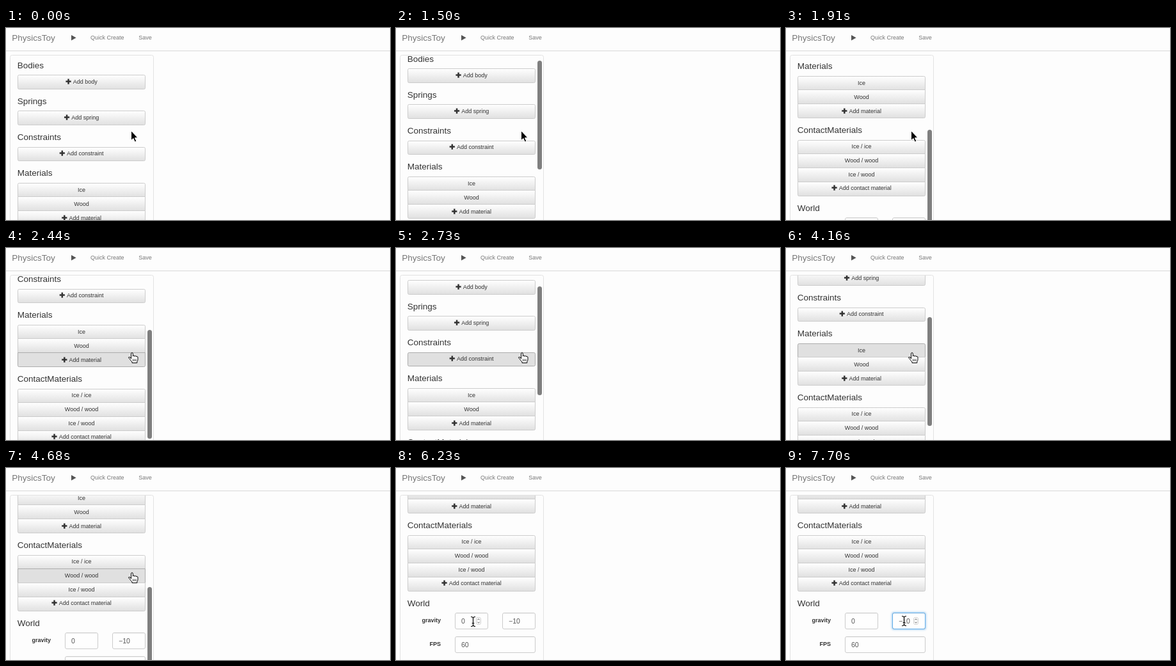
An HTML page for the animation above (8000 ms loop, 600 by 300 pixels).

```html
<!DOCTYPE html>
<html lang="en">
<head>
<meta charset="utf-8">
<title>Physics editor panel</title>
<style>
html, body { margin: 0; width: 100%; height: 100%; overflow: hidden; background: #fdfdfd; }
svg { display: block; width: 600px; height: 300px; font: 9px "Liberation Sans", Arial, sans-serif; fill: #333; }
.nav { fill: #777; }
.head { font-size: 13.5px; }
.label { font-weight: bold; text-anchor: end; }
.value { font-size: 10.5px; fill: #555; }
.btn path.face { fill: url(#face); stroke: #ccc; }
.btn.over path.face { fill: #e0e0e0; stroke: #adadad; }
.field { fill: #fefefe; stroke: #ccc; }
</style>
</head>
<body>
<svg id="stage" viewBox="0 0 600 300">
  <defs>
    <linearGradient id="face" x2="0" y2="1">
      <stop stop-color="#fff"/><stop offset="1" stop-color="#e0e0e0"/>
    </linearGradient>
    <clipPath id="view"><rect x="7" y="43" width="223" height="257"/></clipPath>
    <filter id="blur" x="-20%" y="-40%" width="140%" height="180%"><feGaussianBlur stdDeviation="1.4"/></filter>
  </defs>
  <rect width="600" height="300" fill="#fdfdfd"/>
  <path d="M0 36.5H600" stroke="#f4f4f4"/>
  <path d="M0 35.5H600" stroke="#e0e0e0"/>
  <g class="nav">
    <text x="9.3" y="20" class="head">PhysicsToy</text>
    <path d="M102 11V19.4L109.6 15.2Z" fill="#555"/>
    <text x="132" y="18">Quick Create</text>
    <text x="207.3" y="18">Save</text>
  </g>
  <rect x="6.5" y="42.5" width="224" height="270" rx="3" fill="none" stroke="#e2e2e2"/>
  <g clip-path="url(#view)">
    <g id="content"></g>
    <rect id="bar" x="221" width="7" height="170" rx="3.5" fill="#7f7f7f"/>
  </g>
  <g id="cursor"></g>
</svg>
<script>
const LOOP = 8000, MAX_SCROLL = 237;
const $ = id => document.getElementById(id);
const content = $('content'), bar = $('bar'), cursor = $('cursor');

function add(parent, tag, attrs, text) {
  const el = document.createElementNS('http://www.w3.org/2000/svg', tag);
  for (const key in attrs) el.setAttribute(key, attrs[key]);
  if (text) el.textContent = text;
  parent.append(el);
  return el;
}

// Panel content, in unscrolled coordinates
const buttons = [];

function boxPath(x, y, w, h, top, bottom) {
  const a = top, b = bottom;
  return `M${x} ${y + a}q0 ${-a} ${a} ${-a}h${w - 2 * a}q${a} 0 ${a} ${a}v${h - a - b}` +
    `q0 ${b} ${-b} ${b}h${2 * b - w}q${-b} 0 ${-b} ${-b}z`;
}

function addButton(label, y, base, h = 23, top = 2, bottom = 2) {
  const g = add(content, 'g', { class: 'btn' });
  add(g, 'path', { class: 'face', d: boxPath(18.5, y + .5, 199, h - 1, top, bottom) });
  const text = add(g, 'text', { y: base }, label);
  const icon = label.startsWith('Add') ? 11.5 : 0;
  const x = 118 - (text.getComputedTextLength() + icon) / 2;
  text.setAttribute('x', x + icon);
  if (icon) add(g, 'path', {
    d: `M${x + .2} ${base - 3.4}h8.2m-4.1 -4.1v8.2`, stroke: '#333', 'stroke-width': 2.5
  });
  buttons.push({ g, y, h });
}

function addGroup(labels, y, base) {
  const last = labels.length - 1;
  labels.forEach((label, i) => addButton(label, Math.floor(y + i * 21.7), Math.round(base + i * 21.8),
    23, i ? 0 : 2, i < last ? 0 : 2));
}

function addHead(label, y) {
  add(content, 'text', { class: 'head', x: 17.8, y }, label);
}

function addField(x, y, w, value) {
  const box = { x: x + .5, y: y + .5, width: w - 1, height: 25, rx: 2.5 };
  const glow = add(content, 'rect', {
    ...box, fill: 'none', stroke: '#66afe9', 'stroke-width': 3, filter: 'url(#blur)', opacity: 0
  });
  add(content, 'rect', { ...box, class: 'field' });
  add(content, 'path', { d: `M${x + 2} ${y + 1.5}h${w - 4}`, stroke: '#f3f3f3' });
  const ring = add(content, 'rect', { ...box, fill: 'none', stroke: '#66afe9', opacity: 0 });
  add(content, 'text', { class: 'value', x: x + 10, y: y + 17 }, value);
  const spin = add(content, 'g', { transform: `translate(${x + w - 19} ${y + 7})` });
  add(spin, 'rect', { x: .5, y: .5, width: 7, height: 11, rx: 2.5, fill: '#fcfcfc', stroke: '#d4d4d4' });
  add(spin, 'path', { d: 'M2.2 4.6L4 2.7L5.8 4.6M2.2 7.4L4 9.3L5.8 7.4', fill: 'none', stroke: '#555', 'stroke-width': .9 });
  return { x, y, w, h: 26, glow, ring, spin };
}

addHead('Bodies', 63);
addButton('Add body', 73, 87);
addHead('Springs', 119);
addButton('Add spring', 129, 143);
addHead('Constraints', 175);
addButton('Add constraint', 186, 199, 22);
addHead('Materials', 231);
addGroup(['Ice', 'Wood', 'Add material'], 242, 256);
addHead('ContactMaterials', 331);
addGroup(['Ice / ice', 'Wood / wood', 'Ice / wood', 'Add contact material'], 342, 355);
addHead('World', 453);
add(content, 'text', { class: 'label', x: 70, y: 478 }, 'gravity');
add(content, 'text', { class: 'label', x: 70, y: 515 }, 'FPS');
const fields = [addField(92, 463, 52, '0'), addField(166, 463, 52, '−10')];
const focused = fields[1];
const fps = addField(92, 500, 126, '60');
fps.spin.setAttribute('visibility', 'hidden');
const caret = add(content, 'path', { d: 'M182.5 470v12', stroke: '#333' });

// Pointers, drawn around their hot spot
const pointers = { arrow: add(cursor, 'g', {}), hand: add(cursor, 'g', {}), beam: add(cursor, 'g', {}) };
add(pointers.arrow, 'path', {
  d: 'M.5 -.5V14.7L3.9 11.5L6.3 17L8.8 15.9L6.4 10.7H11Z', fill: '#000', stroke: '#fff'
});
add(pointers.hand, 'path', {
  d: 'M.5 12V4.2Q.5 2.6 1.9 2.6T3.3 4.2V8.2Q3.5 7 4.8 7T6.1 8.5Q6.4 7.4 7.6 7.6T8.7 9Q9 8.2 9.9 8.4T11 10V13' +
    'Q11 15 9.8 16.5V18.5H2V17Q-.5 14.5 -1.5 12.6Q-3.6 11 -3.4 9.8Q-2.5 8.8 -1 10Z',
  fill: '#fff', stroke: '#000', 'stroke-linejoin': 'round'
});
add(pointers.hand, 'path', { d: 'M3.6 12.5v3.5M5.8 12.5v3.5M8 12.5v3.5', stroke: '#000', 'stroke-width': .8 });
for (const [stroke, width] of [['#fff', 2.6], ['#000', 1.2]]) add(pointers.beam, 'path', {
  d: 'M-3 -7.5Q.5 -7.5 .5 -5Q.5 -7.5 4 -7.5M.5 -5.5V5.5M-3 7.5Q.5 7.5 .5 5Q.5 7.5 4 7.5M-1.3 2.5H2.3',
  fill: 'none', stroke, 'stroke-width': width
});

// Progress from 0 to 1 in n visible steps; lead sizes the first one
function steps(t, from, to, n, lead = 1) {
  if (t < from) return 0;
  if (t >= to) return 1;
  const k = Math.floor((t - from) / (to - from) * (n - 1) + .1);
  return (k + lead) / (n - 1 + lead);
}
const ease = p => (1 - Math.cos(Math.PI * p)) / 2;

// start, end, steps, lead, distance
const flicks = [
  [1440, 1910, 9, .3, 167],
  [2200, 2900, 13, .3, -167],
  [3670, 4250, 11, .9, 101],
  [4330, 4860, 7, .3, MAX_SCROLL - 101]
];

function scrollAt(t) {
  return Math.round(flicks.reduce((sum, [a, b, n, lead, d]) => sum + d * ease(steps(t, a, b, n, lead)), 0));
}

function barOpacity(t) {
  if (t < 1440) return 0;
  return t < 3670 ? 1 - steps(t, 3500, 3620, 3) : 1 - steps(t, 5430, 5610, 3);
}

function pointerAt(t) {
  const p = steps(t, 5900, 6230, 5), q = steps(t, 6530, 6930, 6);
  return [195 - 75 * p + 64 * q, 161 + 79 * (1 - (1 - p) ** 2) - q];
}

function render(t) {
  const scroll = scrollAt(t), [x, y] = pointerAt(t), cy = y + scroll;
  content.setAttribute('transform', `translate(0 ${-scroll})`);
  bar.setAttribute('y', 44 + Math.round(scroll * .6875));
  bar.setAttribute('opacity', barOpacity(t));

  let kind = 'arrow';
  const hit = x >= 18 && x < 218 ? buttons.findLast(b => cy >= b.y - 2 && cy < b.y + b.h - 2) : null;
  for (const b of buttons) b.g.classList.toggle('over', b === hit);
  if (hit) kind = 'hand';
  for (const f of fields) {
    const inside = x >= f.x && x < f.x + f.w && cy >= f.y && cy < f.y + f.h;
    f.spin.setAttribute('visibility', inside ? 'visible' : 'hidden');
    if (inside) kind = 'beam';
  }

  focused.ring.setAttribute('opacity', steps(t, 7160, 7280, 3));
  focused.glow.setAttribute('opacity', t >= 7460 ? .6 : 0);
  caret.setAttribute('visibility', t >= 7160 && t < 7700 ? 'visible' : 'hidden');

  cursor.setAttribute('transform', `translate(${Math.round(x)} ${Math.round(y)})`);
  for (const name in pointers) pointers[name].setAttribute('visibility', name === kind ? 'visible' : 'hidden');
}

const start = performance.now();
function tick() {
  render((performance.now() - start) % LOOP);
  requestAnimationFrame(tick);
}
tick();
</script>
</body>
</html>
```
